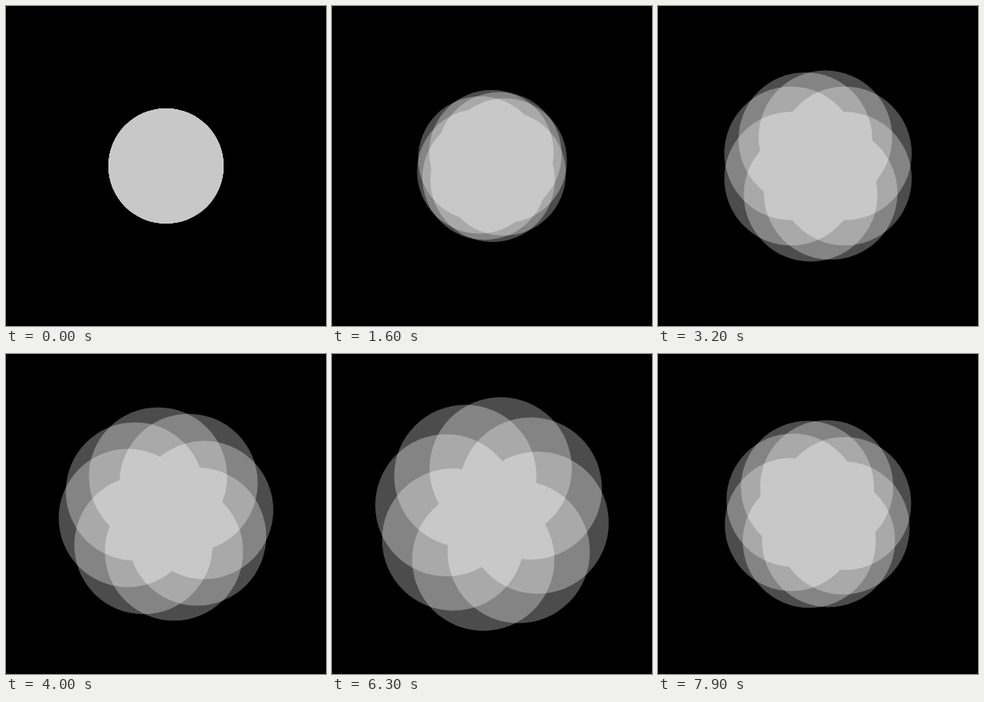
Animation, 400 px wide and 400 px high, one loop 8000 ms. Source, as an HTML page with a canvas:

```html
<!DOCTYPE html>
<html lang="en">
<head>
<meta charset="utf-8">
<title>Breathing flower</title>
<style>
  html, body { margin: 0; width: 100%; height: 100%; overflow: hidden; background: #000; }
  canvas { display: block; filter: url(#tint); }
  svg { position: absolute; width: 0; height: 0; }
</style>
</head>
<body>
<canvas id="stage" width="400" height="400"></canvas>
<!-- Maps the number of overlapping discs (0 to 8) to a grey; four or more look the same -->
<svg>
  <filter id="tint" x="0" y="0" width="1" height="1" color-interpolation-filters="sRGB">
    <feComponentTransfer>
      <feFuncR type="table" tableValues="0 .30 .52 .665 .785 .785 .785 .785 .785"/>
      <feFuncG type="table" tableValues="0 .30 .52 .665 .785 .785 .785 .785 .785"/>
      <feFuncB type="table" tableValues="0 .30 .52 .665 .785 .785 .785 .785 .785"/>
    </feComponentTransfer>
  </filter>
</svg>
<script>
const ctx = document.getElementById('stage').getContext('2d');
const LOOP = 8000, STEP = 100, BREATH = 5000, HOLD = 1000;
const RAD = Math.PI / 180;

// Breathe in, hold, breathe out
function openness(t) {
  if (t < BREATH) return t / BREATH;
  return Math.min(1, 1 - (t - BREATH - HOLD) / BREATH);
}

function draw(t) {
  const p = openness(t);
  const scale = 1 + 0.25 * p;
  const reach = 50 * p * scale;

  ctx.globalCompositeOperation = 'source-over';
  ctx.fillStyle = '#000';
  ctx.fillRect(0, 0, 400, 400);

  // Each disc adds one eighth of full brightness
  ctx.globalCompositeOperation = 'lighter';
  ctx.fillStyle = 'rgb(32, 32, 32)';
  for (let i = 0; i < 8; i++) {
    // Diagonal petals start nearer the horizontal axis
    const lean = 15 * (1 - p) * Math.round(Math.sin(i * Math.PI / 2));
    const angle = (45 * i + lean - 180 * p) * RAD;
    ctx.beginPath();
    ctx.arc(200 + reach * Math.sin(angle), 200 - reach * Math.cos(angle),
            72 * scale, 0, 2 * Math.PI);
    ctx.fill();
  }
}

const start = performance.now();
function tick() {
  const t = (performance.now() - start) % LOOP;
  draw(Math.floor(t / STEP) * STEP);
  requestAnimationFrame(tick);
}
tick();
</script>
</body>
</html>
```
